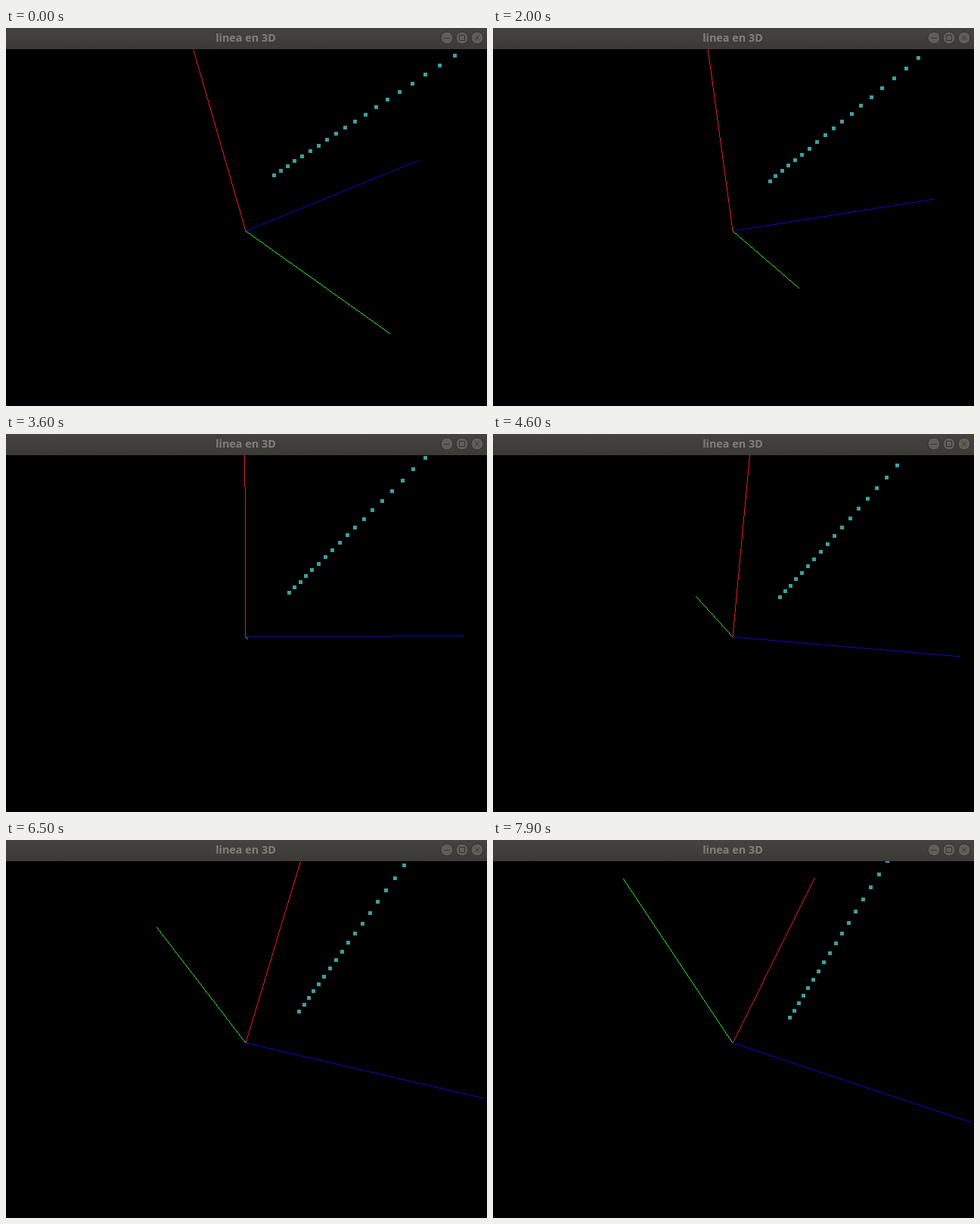
An HTML page with a canvas for the animation above (8000 ms loop, 636 by 499 pixels).

```html
<!DOCTYPE html>
<html lang="es">
<head>
<meta charset="utf-8">
<title>linea en 3D</title>
<style>
  html, body { margin: 0; width: 100%; height: 100%; overflow: hidden; background: #000; }
  canvas { display: block; }
</style>
</head>
<body>
<canvas id="view" width="636" height="499"></canvas>
<script>
const ctx = document.getElementById('view').getContext('2d');
const W = 636, H = 499, BAR = 28;
const LOOP = 8000, STEP = 100;

// Camera: 45 degree field of view on a 640x480 viewport, two units from the origin
const CX = 317, CY = 268, DIST = 2;
const FOCAL = 240 / Math.tan(Math.PI / 8);

// Time (ms) and rotation (degrees) about the axis (1, 1, 1)
const TURN = [
  [0, 32.65], [1000, 23.6], [2000, 14.45], [3600, 0.5], [4500, -8], [5400, -15.95],
  [5500, -17.2], [6300, -24.1], [6500, -25.6], [7200, -32.2], [7900, -38.1]
];

const AXES = [
  { tip: [0, 1, 0], color: '#e01b1f' },
  { tip: [0, 0, 1], color: '#2ee02e' },
  { tip: [1, 0, 0], color: '#0c0ab8' }
];
const DOT_COLOR = '#3ca09f';
const DOT_STEPS = 20;

function angleAt(ms) {
  let i = 1;
  while (i < TURN.length - 1 && ms > TURN[i][0]) i++;
  const [t0, a0] = TURN[i - 1], [t1, a1] = TURN[i];
  return (a0 + (a1 - a0) * (ms - t0) / (t1 - t0)) * Math.PI / 180;
}

function rotate([x, y, z], angle) {
  const c = Math.cos(angle), s = Math.sin(angle) / Math.sqrt(3);
  const along = (x + y + z) * (1 - c) / 3;
  return [
    x * c + (z - y) * s + along,
    y * c + (x - z) * s + along,
    z * c + (y - x) * s + along
  ];
}

function project(p, angle) {
  const [x, y, z] = rotate(p, angle);
  const k = FOCAL / (DIST - z);
  return [CX + x * k, CY - y * k];
}

// One-pixel line without smoothing
function pixelLine([x0, y0], [x1, y1], color) {
  const n = Math.max(1, Math.round(Math.max(Math.abs(x1 - x0), Math.abs(y1 - y0))));
  ctx.fillStyle = color;
  for (let i = 0; i < n; i++) {
    const f = (i + 0.5) / n;
    ctx.fillRect(Math.floor(x0 + (x1 - x0) * f), Math.floor(y0 + (y1 - y0) * f), 1, 1);
  }
}

function drawScene(angle) {
  ctx.save();
  ctx.beginPath();
  ctx.rect(0, BAR, W, H - BAR);
  ctx.clip();
  for (const { tip, color } of AXES) pixelLine([CX, CY], project(tip, angle), color);
  ctx.fillStyle = DOT_COLOR;
  for (let i = 0; i <= DOT_STEPS; i++) {
    const side = 0.2 + 0.02 * i;
    const [x, y] = project([side, side, 0.04 * i], angle);
    ctx.fillRect(Math.floor(x) - 2, Math.floor(y) - 2, 5, 5);
  }
  ctx.restore();
}

function drawButton(x, glyph) {
  ctx.beginPath();
  ctx.arc(x, 13, 8, 0, Math.PI * 2);
  ctx.fillStyle = '#605e57';
  ctx.fill();
  ctx.strokeStyle = '#33322e';
  ctx.lineWidth = 1;
  ctx.stroke();
  ctx.beginPath();
  glyph(x);
  ctx.strokeStyle = '#35342f';
  ctx.stroke();
}

function drawBar() {
  const shade = ctx.createLinearGradient(0, 0, 0, BAR);
  shade.addColorStop(0, '#44433e');
  shade.addColorStop(1, '#3b3a36');
  ctx.fillStyle = shade;
  ctx.fillRect(0, 0, W, BAR);

  ctx.font = 'bold 14.4px "Open Sans", "Noto Sans", sans-serif';
  ctx.textAlign = 'center';
  ctx.textBaseline = 'alphabetic';
  ctx.fillStyle = '#827f77';
  ctx.fillText('linea en 3D', 317, 18);

  drawButton(583, x => { ctx.moveTo(x - 4, 13.5); ctx.lineTo(x + 4, 13.5); });
  drawButton(603, x => ctx.rect(x - 3.5, 9.5, 7, 7));
  drawButton(623, x => {
    ctx.moveTo(x - 3, 10); ctx.lineTo(x + 3, 16);
    ctx.moveTo(x + 3, 10); ctx.lineTo(x - 3, 16);
  });
}

const start = performance.now();

function frame(now) {
  const ms = Math.max(0, now - start) % LOOP;
  ctx.fillStyle = '#000';
  ctx.fillRect(0, 0, W, H);
  drawScene(angleAt(Math.floor(ms / STEP) * STEP));
  drawBar();
  requestAnimationFrame(frame);
}
frame(start);
</script>
</body>
</html>
```
